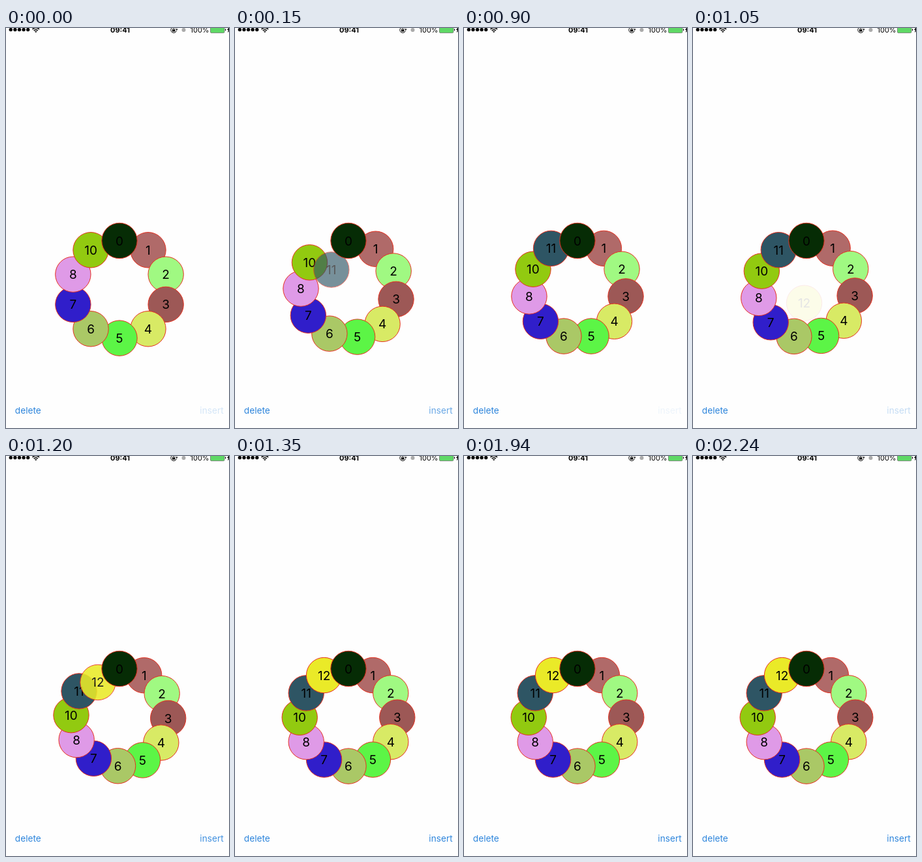
Write an HTML page that moves like this. It is 342 px wide and 614 px high and loops after 2.34 s.

```html
<!DOCTYPE html>
<html lang="en">
<head>
<meta charset="utf-8">
<style>
  html, body { margin: 0; width: 100%; height: 100%; overflow: hidden; background: #fefefe; }
  svg { display: block; width: 342px; height: 614px; font-family: Inter, sans-serif; }
  #ring { font-size: 19px; text-anchor: middle; }
  #ring circle { stroke: #e6301f; }
  .button { font-size: 13.7px; fill: #2f86dc; }
</style>
</head>
<body>
<svg viewBox="0 0 342 614">
  <g id="status" font-size="11">
    <g id="signal"></g>
    <g fill="none" stroke="#000" stroke-width="1.5">
      <path d="M40.5 1.8Q45.8 -2.2 51.1 1.8M42.6 4Q45.8 1.4 49 4"/>
      <path d="M44.4 5L45.8 6.2L47.2 5" stroke-width="1.2"/>
    </g>
    <text x="175" y="7" font-weight="700" text-anchor="middle">09:41</text>
    <path d="M260.7 .2A4.4 4.4 0 1 0 261.4 4.5" fill="none" stroke="#000"/>
    <path d="M260 1.6h3.6l-1.8 2.4zM255 2.2h4.4v3.2h-4.4z"/>
    <path d="M256 2.5v-1a1.2 1.2 0 0 1 2.4 0v1" fill="none" stroke="#000" stroke-width=".8"/>
    <circle cx="272.5" cy="3" r="3" fill="#aaa"/>
    <text x="282.5" y="7" textLength="auto">100%</text>
    <rect x="313.5" y="-2.5" width="21.5" height="10" rx="1.5" fill="#5fd866" stroke="#777" stroke-width=".8"/>
    <path d="M336 1v3.5q1.3 -.5 1.3 -1.75t-1.3 -1.75z"/>
    <path d="M342 -1L339 3h2l-1 4 2-2z"/>
  </g>
  <g id="ring"></g>
  <text class="button" x="13.8" y="592">delete</text>
  <text class="button" id="insert" x="333.8" y="592" text-anchor="end">insert</text>
</svg>
<script>
const LOOP = 2340, STEP = 150, MOVE = 250;
const CENTER = { x: 174, y: 401.3 }, RADIUS = 74.8;
const SPAWN = { x: 174, y: 431 };
const FIRST_INSERT = 0, SECOND_INSERT = 1003, SECOND_PRESS = 900;
const START_COUNT = 10;

const labels = [0, 1, 2, 3, 4, 5, 6, 7, 8, 10, 11, 12];
const colors = ['#062c05', '#b06a69', '#a0f982', '#9d5856', '#d8ea65', '#5cf546',
                '#aac866', '#301eca', '#df9ae7', '#92ca10', '#2e5564', '#eaea28'];

const byId = id => document.getElementById(id);

function add(parent, tag, attributes) {
  const node = document.createElementNS('http://www.w3.org/2000/svg', tag);
  for (const name in attributes) node.setAttribute(name, attributes[name]);
  return parent.appendChild(node);
}

for (let i = 0; i < 5; i++) add(byId('signal'), 'circle', { cx: 7.3 + i * 6.6, cy: 2.6, r: 2.7 });

const cells = labels.map((label, i) => {
  const cell = add(byId('ring'), 'g', {});
  add(cell, 'circle', { r: 27.2, fill: colors[i] });
  add(cell, 'text', { y: 7 }).textContent = label;
  return cell;
});
byId('ring').append(cells[0]); // the first cell stays on top

function ease(elapsed) {
  const u = Math.min(1, Math.max(0, elapsed / MOVE));
  return u * u * (3 - 2 * u);
}

function place(i, count) {
  if (i >= count) return { ...SPAWN, alpha: 0 };
  const angle = i * 2 * Math.PI / count;
  return {
    x: CENTER.x + RADIUS * Math.sin(angle),
    y: CENTER.y - RADIUS * Math.cos(angle),
    alpha: 1
  };
}

function draw(time) {
  // the picture advances in discrete steps
  const t = Math.floor(time % LOOP / STEP) * STEP;
  const second = t >= SECOND_PRESS;
  const count = START_COUNT + (second ? 1 : 0);
  const p = ease(t - (second ? SECOND_INSERT : FIRST_INSERT));
  const mix = (a, b) => a + (b - a) * p;

  cells.forEach((cell, i) => {
    const from = place(i, count), to = place(i, count + 1);
    cell.setAttribute('transform', `translate(${mix(from.x, to.x)} ${mix(from.y, to.y)})`);
    cell.setAttribute('opacity', mix(from.alpha, to.alpha));
  });
  byId('insert').setAttribute('opacity', t === SECOND_PRESS ? 0.08 : mix(0.2, 1));
}

const start = performance.now();
function tick() {
  draw(performance.now() - start);
  requestAnimationFrame(tick);
}
tick();
</script>
</body>
</html>
```
